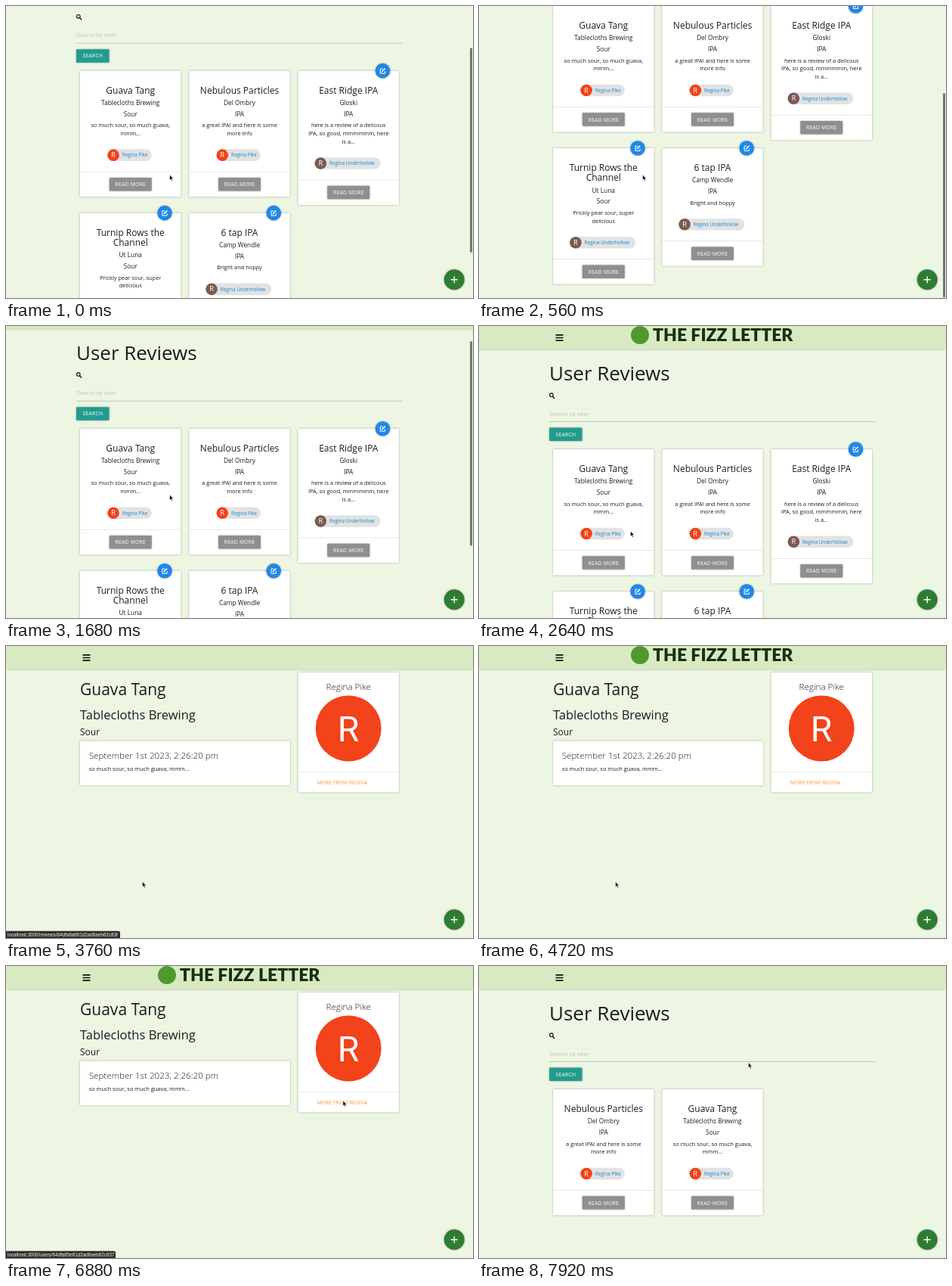
Recreate the animation shown at these times as an HTML page. Size 618 px wide and 386 px high, loop 8000 ms.

```html
<!DOCTYPE html>
<html lang="en">
<head>
<meta charset="utf-8">
<title>Reviews</title>
<style>
html, body { margin: 0; width: 100%; height: 100%; overflow: hidden; background: #edf5e3; }
svg { display: block; width: 618px; height: 386px; }
text { font-family: "Open Sans", sans-serif; fill: #1c1c1c; white-space: pre; }
.mid { text-anchor: middle; }
.light { font-weight: 300; }
.caps { letter-spacing: .243px; }
.white { fill: #fff; }
.link { fill: #1b86d0; }
.orange { fill: #f09c3c; }
.letter { font-family: Roboto, sans-serif; fill: #fff; text-anchor: middle; }
.hint { font-family: "Liberation Sans", Arial, sans-serif; fill: #c3cabb; }
.url { font-family: "Liberation Sans", Arial, sans-serif; fill: #f4f4f4; }
.brand { font-family: Lato, sans-serif; font-weight: 900; fill: #17300f; }
.raised { filter: drop-shadow(0 .9px .9px rgba(0, 0, 0, .34)); }
</style>
</head>
<body>
<svg id="stage" viewBox="0 0 618 386"></svg>
<script>
const RED = '#f2431b', BROWN = '#7b5a50';

const text = (x, y, size, str, cls = '') =>
  `<text x="${x}" y="${y}" font-size="${size}" class="${cls}">${str}</text>`;
const rect = (x, y, w, h, fill, cls = '', r = 1) =>
  `<rect x="${x}" y="${y}" width="${w}" height="${h}" rx="${r}" fill="${fill}" class="${cls}"/>`;
const disc = (x, y, r, fill, cls = '') =>
  `<circle cx="${x}" cy="${y}" r="${r}" fill="${fill}" class="${cls}"/>`;
const path = (d, stroke, width, extra = '') =>
  `<path d="${d}" fill="none" stroke="${stroke}" stroke-width="${width}" ${extra}/>`;

const short = 'Regina Pike', long = 'Regina Underhollow';
const guava = {
  title: ['Guava Tang'], maker: 'Tablecloths Brewing', style: 'Sour',
  note: ['so much sour, so much guava,', 'mmm...'], by: short
};
const nebulous = {
  title: ['Nebulous Particles'], maker: 'Del Ombry', style: 'IPA',
  note: ['a great IPA! and here is some', 'more info'], by: short
};
const ridge = {
  title: ['East Ridge IPA'], maker: 'Gloski', style: 'IPA',
  note: ['here is a review of a delicous', 'IPA, so good, mmmmmm, here', 'is a...'], by: long
};
const turnip = {
  title: ['Turnip Rows the', 'Channel'], maker: 'Ut Luna', style: 'Sour',
  note: ['Prickly pear sour, super', 'delicious'], by: long
};
const tap = {
  title: ['6 tap IPA'], maker: 'Camp Wendle', style: 'IPA',
  note: ['Bright and hoppy'], by: long
};

function editBadge(x, y) {
  return disc(x, y, 9.8, '#2188e6', 'raised') +
    path(`M${x} ${y - 2.8}h-3.1v6.2h6.2v-3`, '#fff', 1, 'stroke-linejoin="round"') +
    path(`M${x - 1.2} ${y + 1.3}l4.4-4.5`, '#fff', 1.6);
}

function card(col, top, { title, maker, style, note, by }) {
  const x = 98 + 144.25 * col, cx = x + 66.75;
  const shift = top + 13.3 * (title.length - 1);
  const chip = shift + 89.9 + 10.8 * note.length;
  const own = by === long;
  const left = own ? cx - 44.7 : cx - 30.5, width = own ? 87 : 58.5;
  return rect(x, top, 133.5, chip + 55 - top, '#fff', 'raised') +
    title.map((s, i) => text(cx, top + 30.3 + 13 * i, 12, s, 'mid')).join('') +
    text(cx, shift + 45.3, 8.35, maker, 'mid') +
    text(cx, shift + 60, 8.35, style, 'mid') +
    note.map((s, i) => text(cx, shift + 74.6 + 10.8 * i, 7.42, s, 'mid')).join('') +
    rect(left, chip - 7.8, width, 15.6, '#e2e2e2', '', 7.8) +
    disc(left + 7.8, chip, 7.8, own ? BROWN : RED) +
    text(left + 7.8, chip + 3.1, 8.7, 'R', 'letter') +
    text(left + 19.5, chip + 2.3, 6.35, by, 'link') +
    rect(x, chip + 21.6, 133.5, .6, '#d9d9d9', '', 0) +
    rect(cx - 28, chip + 29.8, 56, 17.5, '#8f8f8f', 'raised') +
    text(cx, chip + 41, 6.8, 'READ MORE', 'mid caps white') +
    (own ? editBadge(x + 112, top) : '');
}

const header = rect(0, -4, 618, 35, '#d9e9c2', 'raised', 0) +
  path('M101.5 11.8h10M101.5 15.5h10M101.5 19.2h10', '#111', 1.7);

const listTop = header +
  text(93, 72, 26, 'User Reviews') +
  disc(95.8, 91.2, 2.3, 'none" stroke="#111" stroke-width="1.1') +
  path('M97.4 92.9l2.7 2.8', '#111', 1.4) +
  text(93, 118.6, 7.78, 'Search by beer', 'hint') +
  rect(93, 126.1, 432, .7, '#adb3a6', '', 0) +
  rect(93, 134.5, 43.5, 17.5, '#219c8e', 'raised') +
  text(114.8, 145.7, 6.8, 'SEARCH', 'mid caps white');

const listPage = listTop + card(0, 163, guava) + card(1, 163, nebulous) +
  card(2, 163, ridge) + card(0, 351, turnip) + card(1, 351, tap);

const detailPage = header +
  text(98, 64.8, 21, guava.title[0]) +
  text(98, 96.8, 16.5, guava.maker) +
  text(98, 118.4, 12, guava.style) +
  rect(98, 125.5, 278, 59, '#fff', 'raised') +
  text(109.7, 149, 11.66, 'September 1st 2023, 2:26:20 pm', 'light') +
  text(109.7, 165.3, 7.42, guava.note.join(' ')) +
  rect(386.5, 35, 133.5, 158.5, '#fff', 'raised') +
  text(453.2, 58.2, 11.66, short, 'mid light') +
  disc(453.2, 109, 43.5, RED) +
  text(453.2, 126, 46.5, 'R', 'letter') +
  rect(386.5, 166.2, 133.5, .6, '#e0e0e0', '', 0) +
  text(411.8, 182.9, 6.8, 'MORE FROM REGINA', 'orange');

const userPage = listTop + card(0, 163, nebulous) + card(1, 163, guava);

const statusBar = (id, width, url) => `<g id="${id}">` +
  rect(-4, 376.8, width + 4, 14, '#2d2e2d', '', 2) + text(2, 383.7, 6.3, url, 'url') + '</g>';

const $ = id => document.getElementById(id);
$('stage').innerHTML =
  `<g id="list">${listPage}</g><g id="detail">${detailPage}</g><g id="user">${userPage}</g>` +
  `<g id="logo">${disc(213, 12, 12, '#4f9a2e')}${text(230, 20, 23, 'THE FIZZ LETTER', 'brand')}</g>` +
  disc(593.2, 361.7, 13.5, '#2e7d32', 'raised') +
  path('M588.7 361.7h9M593.2 357.2v9', '#fff', 1.4) +
  rect(614, 0, 3, 270.5, '#737671', '" id="bar', 1.5) +
  statusBar('reviewUrl', 151, 'localhost:3000/reviews/64dfa8a661d2ad6aeb62c83f') +
  statusBar('userUrl', 145, 'localhost:3000/users/64dfa85e61d2ad6aeb62c837') +
  '<path id="cursor" d="M0 0V7.2L1.7 5.7L2.8 8.2L4 7.7L2.9 5.2H5Z" fill="#000" stroke="#fff" stroke-width=".6"/>';

// time, x, y of the pointer tip
const pointer = [
  [0, 216.5, 223], [2320, 216.5, 223], [2640, 200.5, 271], [2960, 180.5, 311.5],
  [4900, 180.5, 311.5], [5320, 207, 294], [5840, 387, 179.5], [6300, 446, 178],
  [7060, 446, 178], [7700, 356.5, 127.5], [8000, 356.5, 127.5]
];
const clamp = u => Math.min(1, Math.max(0, u));
const smooth = u => u * u * (3 - 2 * u);

function pointerAt(t) {
  const i = pointer.findIndex(k => k[0] > t);
  const [t0, x0, y0] = pointer[i - 1], [t1, x1, y1] = pointer[i];
  const u = (t - t0) / (t1 - t0);
  return [x0 + (x1 - x0) * u, y0 + (y1 - y0) * u];
}

function scrollAt(t) {
  if (t < 1000) return 163 - 86 * (1 - clamp(t / 500)) ** 2;
  return 163 * (1 - smooth(clamp((t - 1000) / 920)));
}

const show = (id, on) => { $(id).style.display = on ? '' : 'none'; };

function draw(t) {
  const scroll = scrollAt(t), onList = t < 3440, onUser = t >= 7000;
  show('list', onList);
  show('detail', !onList && !onUser);
  show('user', onUser);
  show('logo', onList || (t >= 4320 && !onUser));
  show('reviewUrl', t >= 3040 && t < 4200);
  show('userUrl', t >= 6480 && t < 7440);
  const shift = `translate(0 ${-scroll})`;
  $('list').setAttribute('transform', shift);
  $('logo').setAttribute('transform', shift);
  $('bar').setAttribute('y', 1 + .7 * scroll);
  $('bar').setAttribute('opacity', 1 - clamp((t - 2320) / 240));
  $('cursor').setAttribute('transform', `translate(${pointerAt(t)})`);
}

function tick() {
  draw(performance.now() % 8000);
  requestAnimationFrame(tick);
}
tick();
</script>
</body>
</html>
```
